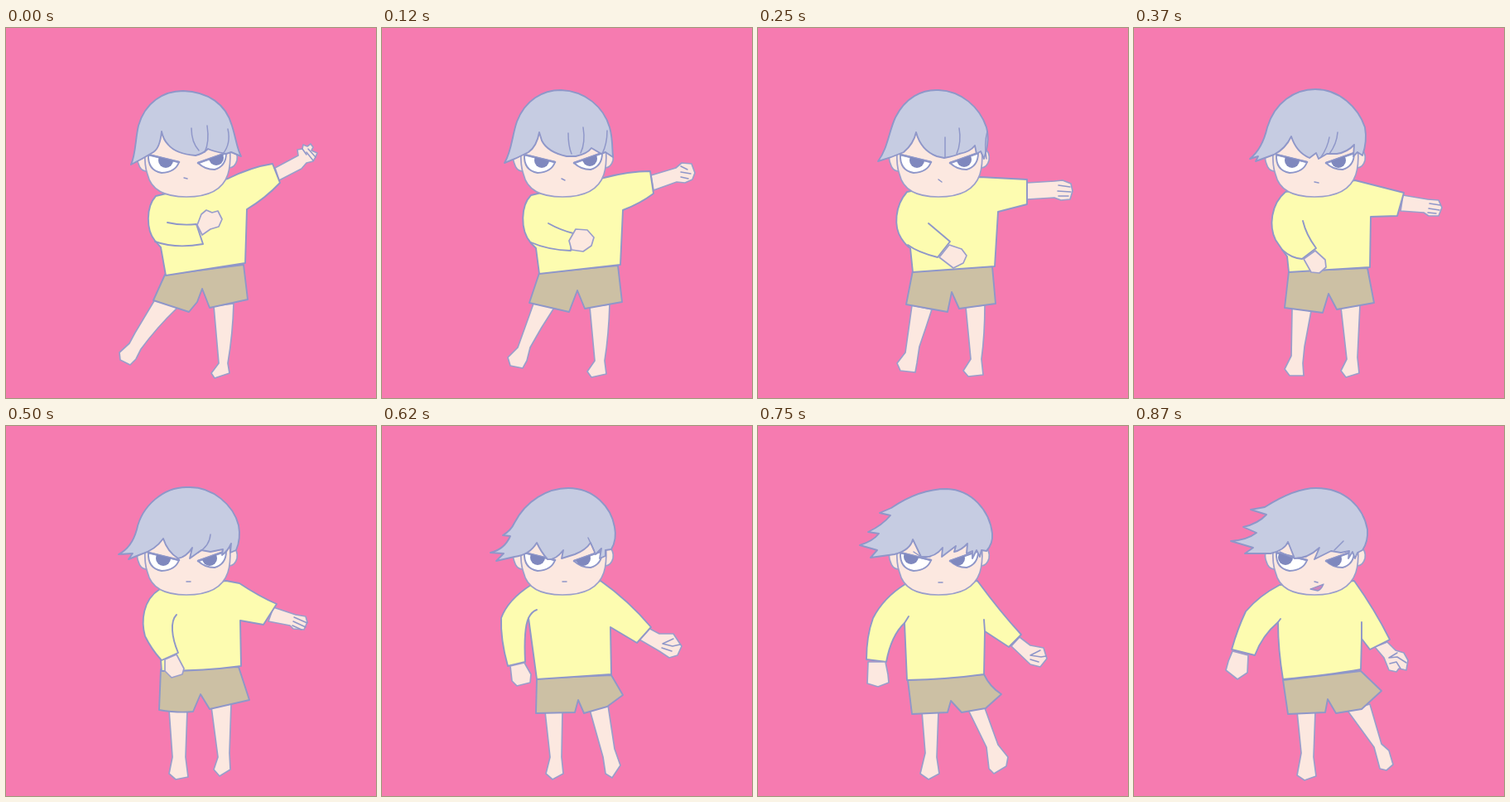
An HTML page without scripts for the animation above (1000 ms loop, 447 by 447 pixels).

```html
<!DOCTYPE html>
<html lang="en">
<head>
<meta charset="utf-8">
<title>Dancing boy</title>
<style>
  html, body { margin: 0; width: 100%; height: 100%; overflow: hidden; background: #f67bb0; }
  svg { display: block; width: 100%; height: 100%; stroke: #8f97c9; stroke-width: 1.9; stroke-linejoin: round; stroke-linecap: round; }
  .skin { fill: #fce8e0; stroke: #9a9ecb; stroke-width: 1.7; }
  .shirt { fill: #fdfcb0; }
  .shorts { fill: #ccc0a4; }
  .hair { fill: #c6cce2; }
  .white { fill: #fff; }
  .line { fill: none; }
  .thin { fill: none; stroke-width: 1.5; }
  .lid { fill: none; stroke-width: 2.6; }
  .iris { fill: #7f88be; stroke: none; }
  .mouth { fill: #cf86bd; stroke-width: 1.3; }

  .pose { visibility: hidden; animation: short 1s step-end calc(var(--at) - 1s) infinite; }
  .pose:nth-of-type(even) { animation-name: long; }
  @keyframes short { 0% { visibility: visible } 12%, 100% { visibility: hidden } }
  @keyframes long { 0% { visibility: visible } 13%, 100% { visibility: hidden } }
</style>
</head>
<body>
<svg viewBox="0 0 447 447">
  <defs>
    <path id="eyeL" d="M172 153Q171 172 188 175Q205 174 209 162Z"/>
    <path id="eyeR" d="M232 163Q240 171 252 171Q266 167 266 151Z"/>
    <clipPath id="eyes"><use href="#eyeL"/><use href="#eyeR"/></clipPath>
    <circle id="iris" class="iris" cy="160" r="9"/>
    <g id="face">
      <path class="skin" d="M166 146Q155 152 160 164Q162 172 169 173M270 144Q281 148 279 160Q277 168 270 169"/>
      <path class="skin" d="M175 110Q163 155 171 177C175 195 191 204 218 204C246 204 262 195 268 177Q275 155 265 110Z"/>
      <use href="#eyeL" class="white"/><use href="#eyeR" class="white"/>
      <path class="lid" d="M172 153L209 162M232 163L266 151"/>
    </g>
  </defs>

  <g class="pose" style="--at:0s">
    <path class="skin" d="M180 328L156 368L149 381L137 392L138 401L150 407L157 400L163 388Q182 362 207 338ZM251 336L257 405L248 417L252 423L270 417L268 405Q274 370 275 333Z"/>
    <path class="shorts" d="M192 298L178 329L221 343L231 331L237 315L246 338L292 328L287 286Z"/>
    <path class="skin" d="M325 169L353 154L352 147L358 146L359 141L364 143L368 140L371 144L369 148L376 151L374 156L371 161L363 163L357 170L330 184Z"/>
    <path class="thin" d="M358 146L363 153M363 150L371 160M365 146L374 156"/>
    <path class="shirt" d="M181 203C169 216 169 244 180 257L187 265L193 299L289 284L291 219Q313 206 331 187L322 164Q296 168 268 182Z"/>
    <path class="line" d="M195 235Q212 239 230 237L238 261Q205 267 180 258"/>
    <path class="skin" d="M231 238L236 225L242 220L249 223L256 221L261 231L257 240L247 243L237 250Z"/>
    <use href="#face"/>
    <g clip-path="url(#eyes)"><use href="#iris" x="193"/><use href="#iris" x="254" y="-3"/></g>
    <path class="hair" d="M151 165C157 152 156 135 160 118C168 90 190 76 214 76C244 77 266 92 273 118C278 134 279 146 284 155L272 150L266 152Q250 149 244 146Q238 152 229 154Q205 152 196 141Q190 135 188 125Q186 145 178 150Q165 158 151 165Z"/>
    <path class="thin" d="M224 121Q224 138 233 148M243 118Q246 138 240 150M268 122Q272 140 262 152M215 181L219 182"/>
  </g>

  <g class="pose" style="--at:.12s">
    <path class="skin" d="M183 333L164 386L152 398L155 408L170 411L175 402L179 386Q192 362 208 338ZM251 337L257 402L248 415L253 422L271 418L269 402Q274 370 275 334Z"/>
    <path class="shorts" d="M190 296L178 332L226 343L236 317L245 339L290 331L285 287Z"/>
    <path class="skin" d="M325 178L355 169L362 163L374 164L378 175L375 183L366 187L356 186L328 196Z"/>
    <path class="thin" d="M361 167L369 171M361 174L373 176M361 180L370 182"/>
    <path class="shirt" d="M180 202C168 214 166 244 180 260L186 266L190 297L288 286L291 220Q312 212 328 200L324 173Q298 173 268 181Z"/>
    <path class="line" d="M201 236Q215 244 231 248L228 269Q200 268 180 259"/>
    <path class="skin" d="M226 257L234 243L248 244L256 253L253 263L243 270L229 268Z"/>
    <use href="#face"/>
    <g clip-path="url(#eyes)"><use href="#iris" x="193"/><use href="#iris" x="251" y="-2"/></g>
    <path class="hair" d="M148 163C157 148 157 130 163 113C173 87 194 75 216 75C246 76 268 96 275 120C279 134 278 147 279 156L270 150L265 152Q258 148 253 145Q248 152 234 155L223 155Q200 150 193 136L190 126Q187 143 177 150Q162 158 148 163Z"/>
    <path class="thin" d="M225 127Q225 143 229 152M243 120Q246 138 240 151M272 124Q272 140 266 152M217 182L221 184"/>
  </g>

  <g class="pose" style="--at:.25s">
    <path class="skin" d="M186 335L178 392L168 405L172 414L190 416L192 405L195 385Q203 362 210 340ZM251 337L257 400L248 414L254 421L272 419L270 400Q274 370 274 335Z"/>
    <path class="shorts" d="M187 293L179 334L229 343L234 319L243 339L287 333L283 288Z"/>
    <path class="skin" d="M325 187L358 185L368 184L378 188L380 197L377 207L366 208L358 205L325 207Z"/>
    <path class="thin" d="M363 190L377 192M362 197L378 198M363 203L375 203"/>
    <path class="shirt" d="M180 198C165 215 164 240 173 254Q179 263 184 266L187 295L286 288L290 222L325 213V183L268 180Z"/>
    <path class="line" d="M206 236L232 258L217 277Q193 271 181 262"/>
    <path class="skin" d="M219 277L231 262L246 267L252 275L248 284L236 290Z"/>
    <use href="#face"/>
    <g clip-path="url(#eyes)"><use href="#iris" x="192"/><use href="#iris" x="249" y="-1"/></g>
    <path class="hair" d="M145 161C157 145 158 125 166 108C178 84 198 74 218 75C246 76 268 96 276 120C280 135 276 148 273 158L269 149L264 152L262 142Q256 150 243 152Q240 154 225 157L216 155Q197 148 191 126Q188 140 176 150Q160 157 145 161Z"/>
    <path class="thin" d="M226 132V156M243 121Q246 138 240 152M277 125Q273 140 276 158M218 183L222 186"/>
  </g>

  <g class="pose" style="--at:.37s">
    <path class="skin" d="M191 338L190 396L182 412L188 420L205 420L204 405L206 385L214 342ZM250 338L257 400L250 414L256 422L272 417L270 398L273 335Z"/>
    <path class="shorts" d="M187 294L182 338L228 344L235 321L245 340L290 332L282 290Z"/>
    <path class="skin" d="M325 202L355 207L368 208L372 217L368 227L356 227L350 223L322 221Z"/>
    <path class="thin" d="M357 212L370 214M356 218L369 220M355 223L365 224"/>
    <path class="shirt" d="M183 198C165 213 163 240 171 256Q179 268 185 276L187 295L285 289L286 228L318 227L326 199L267 184Z"/>
    <path class="line" d="M204 233Q208 250 220 266L203 279Q190 278 179 268"/>
    <path class="skin" d="M205 279L219 269L231 280L232 289L224 296L214 295Z"/>
    <use href="#face"/>
    <g clip-path="url(#eyes)"><use href="#iris" x="191"/><use href="#iris" x="247"/></g>
    <path class="hair" d="M140 158Q155 146 161 120C170 90 194 74 219 74C248 74 271 96 279 120Q282 137 276 154L270 150L265 155L266 141Q258 150 245 152L233 152L223 158L220 151L212 157Q196 150 190 131Q183 146 169 153L147 161L150 155Z"/>
    <path class="thin" d="M236 132Q234 144 226 156M246 126Q245 140 236 152M218 186L223 187"/>
  </g>

  <g class="pose" style="--at:.5s">
    <path class="skin" d="M197 343L201 400L197 420L205 427L220 424L217 400L219 343ZM248 339L256 400L251 415L258 423L271 415L270 395L272 336Z"/>
    <path class="shorts" d="M187 294L185 343Q208 347 226 345L235 324L246 342L294 331L281 291Z"/>
    <path class="skin" d="M323 219L350 228L362 230L364 237L360 246L347 245L343 241L317 236Z"/>
    <path class="thin" d="M348 231L364 238M347 236L362 243M346 241L357 246"/>
    <path class="shirt" d="M186 197C165 210 163 236 168 254Q176 270 187 282L188 296Q240 296 284 290L283 235L311 240L327 215Q306 206 282 190L266 187Z"/>
    <path class="line" d="M206 228C198 236 200 255 208 274L188 283"/>
    <path class="skin" d="M192 282L206 276L215 293L213 300L200 304L192 296Z"/>
    <use href="#face"/>
    <g clip-path="url(#eyes)"><use href="#iris" x="190"/><use href="#iris" x="246"/></g>
    <path class="hair" d="M136 155Q152 147 158 125C164 97 190 73 220 74C250 73 275 96 281 120Q284 136 278 150L271 153L272 142Q268 151 261 156L262 149L247 152L236 150L222 160L225 147Q218 158 208 160Q195 152 190 136Q180 150 163 155L148 161L153 154Z"/>
    <path class="thin" d="M247 131Q246 145 232 153M218 188H223"/>
  </g>

  <g class="pose" style="--at:.62s">
    <path class="skin" d="M197 345L203 400L198 420L206 427L219 420L217 400L218 345ZM251 343L267 400L270 420L278 425L288 410L281 390L273 337Z"/>
    <path class="shorts" d="M187 305L186 347L233 346L237 331L244 347L272 339L291 325L277 301Z"/>
    <path class="skin" d="M320 243L335 251L352 251L362 266L357 277L347 280L335 272L311 258Z"/>
    <path class="thin" d="M352 257L339 263L351 266M338 268L350 272M351 266L360 264"/>
    <path class="shirt" d="M180 192Q152 210 144 232Q143 258 152 290L173 285Q171 245 177 232L187 306L277 300L276 243L308 262L325 243Q298 211 264 187Z"/>
    <path class="line" d="M177 232Q181 224 187 222"/>
    <path class="skin" d="M155 290L172 286L180 300L179 310L163 314L157 308Z"/>
    <use href="#face"/>
    <g clip-path="url(#eyes)"><use href="#iris" x="188" y="-1"/><use href="#iris" x="243"/></g>
    <path class="hair" d="M146 132Q156 126 160 117C174 90 200 75 225 75C256 75 277 98 281 122Q284 137 277 149L270 150L270 157L263 160L265 148L258 155L252 141Q246 150 233 155L217 160L219 150Q210 162 200 161Q192 152 187 141Q178 156 160 158L138 163L147 154L131 153Q148 149 155 133Z"/>
    <path class="thin" d="M249 135L256 150M218 188H223"/>
  </g>

  <g class="pose" style="--at:.75s">
    <path class="skin" d="M198 345L202 395L196 420L206 427L219 420L216 400L218 345ZM254 343L276 388L279 414L285 420L300 411L302 400L290 385L273 338Z"/>
    <path class="shorts" d="M181 307L186 348L229 346L233 332L246 346L275 341L294 324Q280 315 273 300Z"/>
    <path class="skin" d="M316 255L329 265L345 268L349 281L341 291L329 288L306 266Z"/>
    <path class="thin" d="M341 271L329 277L342 279M329 282L339 285M342 279L348 278"/>
    <path class="shirt" d="M178 191Q152 207 139 232Q131 254 131 282L155 285Q161 253 177 238L180 307Q230 306 273 300L274 248L303 267L318 252Q293 225 265 187Z"/>
    <path class="line" d="M177 238L182 230M274 248L273 234"/>
    <path class="skin" d="M133 285H154L157 300L158 310L145 315L132 311Z"/>
    <use href="#face"/>
    <g clip-path="url(#eyes)"><use href="#iris" x="185" y="-2"/><use href="#iris" x="241"/></g>
    <path class="hair" d="M147 105L161 99C183 84 205 76 228 76C258 77 280 102 283 130Q284 142 276 151L270 150L268 158L264 150L259 160L259 151L252 154L253 142Q246 150 237 152L239 145L222 158L223 147Q213 160 197 158L187 137Q184 150 165 155L136 159L144 150L123 144Q139 139 146 130L133 128Q150 120 160 108Z"/>
    <path class="thin" d="M188 152L197 158L208 158M218 189H223"/>
  </g>

  <g class="pose" style="--at:.87s">
    <path class="skin" d="M197 345L202 395L197 422L206 428L220 423L217 400L219 345ZM258 344L290 388L297 414L305 416L313 409L308 392L299 384L285 336Z"/>
    <path class="shorts" d="M180 307L186 348L231 346L234 330L244 347L275 342L299 320L274 296Z"/>
    <path class="skin" d="M306 261L316 271L326 274L331 283L329 295L320 293L317 297L308 295L302 280L291 267Z"/>
    <path class="thin" d="M318 274L308 280L318 279L329 286M309 287L317 285L322 293"/>
    <path class="shirt" d="M176 192Q151 205 135 224Q125 245 118 270L146 277Q155 253 174 237Q174 270 180 306Q235 301 274 294L275 257L285 270L309 258Q291 222 266 187Z"/>
    <path class="line" d="M174 237L177 233M275 257V237"/>
    <path class="skin" d="M119 272L138 277L137 298L125 306L111 295L114 284Z"/>
    <use href="#face"/>
    <g clip-path="url(#eyes)"><use href="#iris" x="183" y="-1"/><use href="#iris" x="242" y="1"/></g>
    <path class="hair" d="M141 101L158 98C180 84 200 75 220 75C255 75 277 98 282 125Q283 140 276 150L270 153L267 160L264 152L259 160L260 151L250 153L238 151L218 161L224 147Q210 160 194 160L186 140Q182 150 165 154L134 154L144 147L117 139Q136 138 148 129L132 122Q150 118 160 107Z"/>
    <path class="thin" d="M176 152L194 160L208 158M242 150L253 139M218 188L222 189"/>
    <path class="mouth" d="M213 197L229 191Q226 198 222 199Z"/>
  </g>
</svg>
</body>
</html>
```
